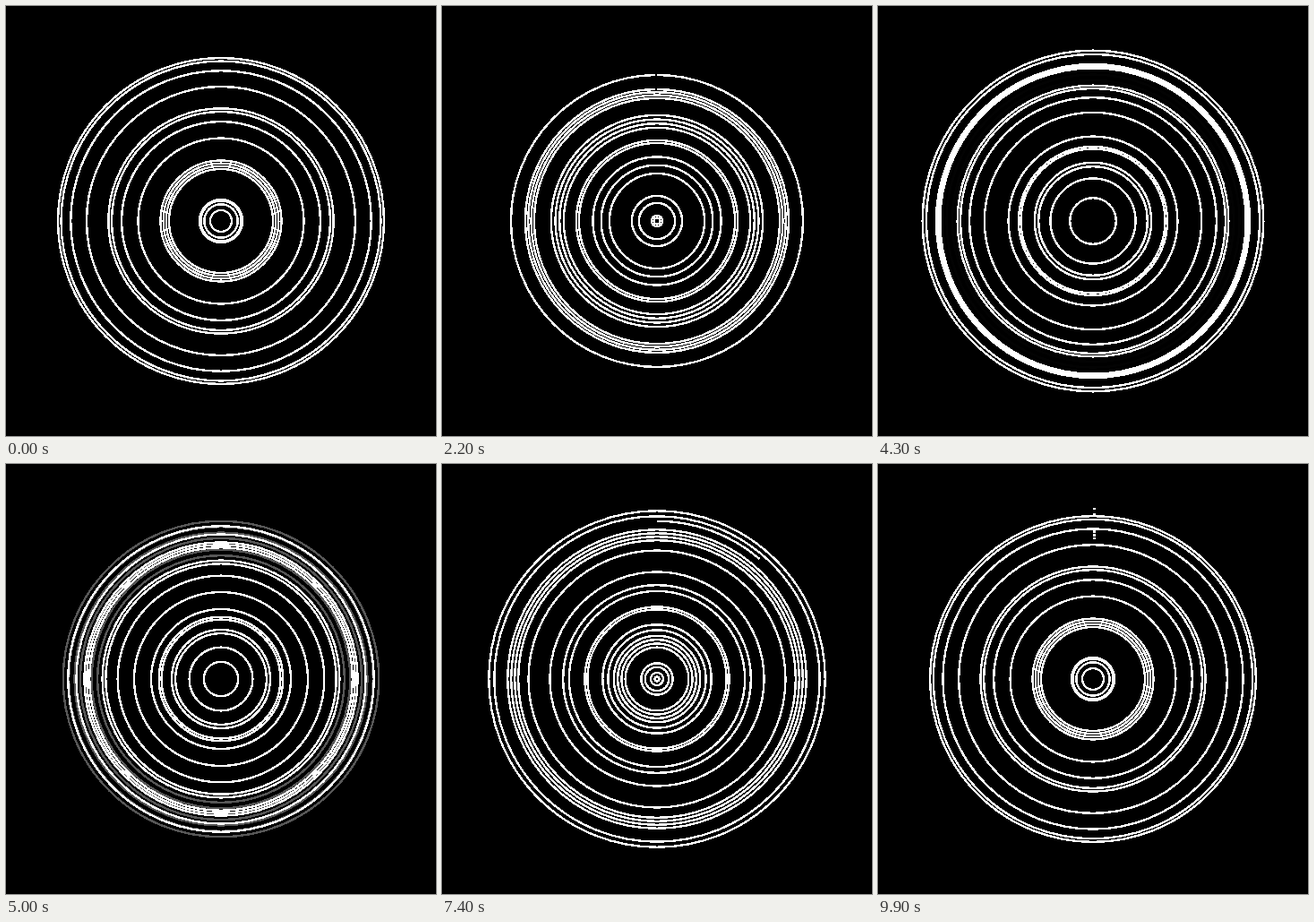
These frames come from a looping animation (480 by 480 pixels, 10000 ms). An HTML page:

```html
<!DOCTYPE html>
<html lang="en">
<head>
<meta charset="utf-8">
<title>Concentric rings</title>
<style>
html, body { margin: 0; width: 100%; height: 100%; overflow: hidden; background: #000; }
svg { display: block; width: 100vw; height: 100vh; }
</style>
</head>
<body>
<svg viewBox="0 0 480 480">
  <rect width="480" height="480"/>
  <g id="rings" transform="translate(240 240) rotate(-90)" fill="none" stroke="#fff" stroke-width="2.4" shape-rendering="crispEdges"></g>
</svg>
<script>
const LOOP = 10000, SPAN = 2000, HOLD = 100, STEP = 100;
const NS = "http://www.w3.org/2000/svg";

// Spreads count rings from one radius to another.
function band(inner, outer, count) {
  return Array.from({ length: count }, (_, i) => inner + (outer - inner) * i / (count - 1));
}

// The same, with the rings crowding towards the outer edge.
function packed(inner, outer, count) {
  return band(0, 1, count).map(u => outer - (outer - inner) * (1 - u) ** 2);
}

// Each state runs from the inside out.
const STATES = [
  [packed(12, 24, 4), band(58, 67.5, 4), packed(92.5, 125.7, 4), packed(150, 182, 4)],
  [band(3.5, 6, 2), 20, 28, band(53, 71.5, 3), 87, 90, band(104, 118, 4), band(137, 147, 4), 163],
  [packed(26, 65.5, 4), 81, 83.5, 95, packed(122, 152, 4), band(171.5, 175.8, 3), 187, 191],
  [6, 11, band(31, 48.5, 6), 70, band(90, 112, 6), band(131.5, 176.3, 8)],
  [band(2, 15.5, 4), band(35, 57, 6), 75.5, 78.3, 97.5, 104.5, 120.5, 145, band(157, 168, 4), 184, 190]
].map(state => state.flat());

const group = document.getElementById("rings");
const most = Math.max(...STATES.map(s => s.length));
const rings = Array.from({ length: most }, () =>
  group.appendChild(document.createElementNS(NS, "circle")));

function easeCirc(t) {
  return t < 0.5
    ? (1 - Math.sqrt(1 - 4 * t * t)) / 2
    : (1 + Math.sqrt(1 - (2 - 2 * t) ** 2)) / 2;
}

function setRing(ring, r, opacity, part) {
  const len = 2 * Math.PI * r;
  ring.setAttribute("r", r);
  ring.setAttribute("opacity", opacity);
  ring.setAttribute("stroke-dasharray", part < 1 ? `${len * part} ${len * 2}` : "none");
}

function draw(ms) {
  const time = Math.floor((ms % LOOP) / STEP) * STEP;
  const index = Math.floor(time / SPAN);
  const from = STATES[index];
  const to = STATES[(index + 1) % STATES.length];
  const p = easeCirc(Math.max(0, time % SPAN - HOLD) / (SPAN - HOLD));

  rings.forEach((ring, i) => {
    const a = from[i], b = to[i];
    if (a === undefined && b === undefined) setRing(ring, 0, 0, 1);
    else if (a === undefined) setRing(ring, b, p, 1);      // fades in
    else if (b === undefined) setRing(ring, a, 1, 1 - p);  // sweeps away
    else setRing(ring, a + (b - a) * p, 1, 1);
  });
}

const start = performance.now();
function tick() {
  draw(performance.now() - start);
  requestAnimationFrame(tick);
}
tick();
</script>
</body>
</html>
```
